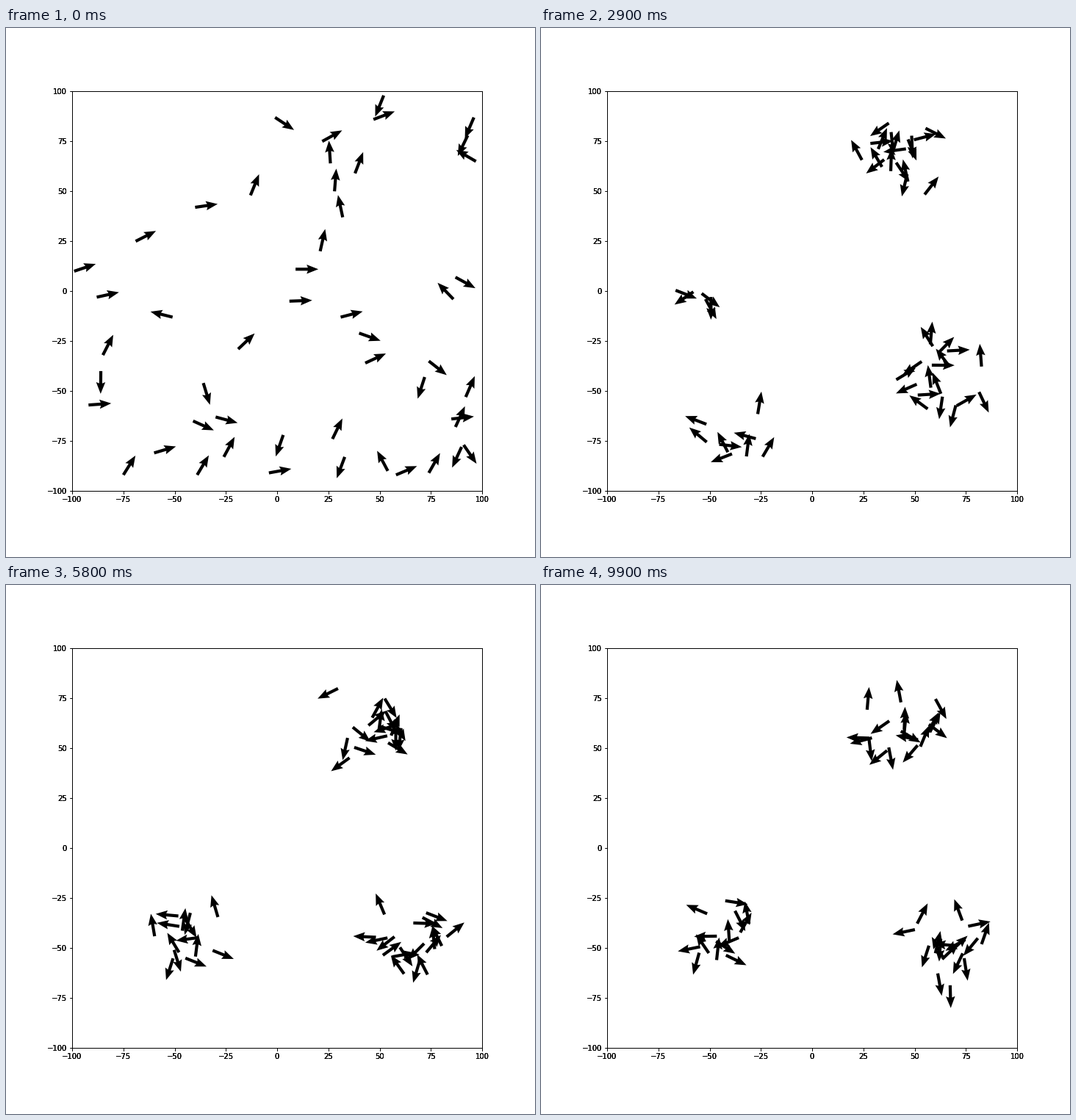
Recreate the animation shown at these times as a matplotlib script. Size 720 by 720 pixels, loop 10000 ms.

```python
import numpy as np
import matplotlib.pyplot as plt
from matplotlib.animation import FuncAnimation

FRAMES, INTERVAL, LIMIT = 100, 100, 100

# start points, sorted by heading
X = np.array([
    9, 6, -92, 85, -40, -4, -88, 31, -60, -99, 47, 58, 43, -69, 22, -19, -75,
    -39, 74, -26, -85, 27, 87, 92, -13, 38, 21, 28, 26, 32, 54, 86, 97, -51,
    93, 90, 96, 52, 33, 3, 72, -86, -36, 91, 74, -1, 87, -41, 40, -30])
Y = np.array([
    11, -5, -57, -64, 42, -91, -3, -13, -81, 10, 86, -92, -36, 25, 75, -29,
    -92, -92, -91, -83, -32, -74, -68, -53, 48, 59, 20, 50, 64, 37, -90, -4,
    65, -13, 78, -78, 87, 98, -83, -72, -43, -40, -46, -77, -35, 87, 7, -65,
    -21, -63])
N = len(X)
HEADING = np.radians(np.interp(
    np.arange(N),
    [0, 14, 16, 25, 29, 33, 34, 40, 44, 49],
    [0, 29, 58, 69, 102, 166, 244, 252, 322, 345]))

# west, south-west, north-east, south-east
FLOCK = np.select([(X < -45) & (abs(Y) < 35), (X < -25) & (Y < -35), Y > -10],
                  [0, 1, 2], 3)
HOME = np.array([[-62, 1], [-34, -72], [36, 65], [62, -43]])[FLOCK]
MERGED = np.array([[-46, -44], [-46, -44], [43, 62], [63, -48]])[FLOCK]
RADIUS = np.array([14, 15, 20, 19])[FLOCK]


def centres(step):
    t = np.clip((step - 20) / 35, 0, 1)
    return HOME + (MERGED - HOME) * t * t * (3 - 2 * t)


def polar(angle):
    return np.column_stack([np.cos(angle), np.sin(angle)])


def simulate():
    rng = np.random.default_rng(7)
    pos, angle = np.column_stack([X, Y]).astype(float), HEADING
    reach = RADIUS * np.sqrt(rng.random(N))
    phase = rng.uniform(-np.pi, np.pi, N)
    spin = rng.normal(0, 0.04, N)
    states = [(pos, angle)]
    for step in range(1, FRAMES):
        goal = centres(step) + reach[:, None] * polar(phase + spin * step)
        gap = goal - pos
        error = np.arctan2(gap[:, 1], gap[:, 0]) - angle
        error = (error + np.pi) % (2 * np.pi) - np.pi
        angle = angle + 0.3 * error + rng.normal(0, 0.35, N)
        speed = 1.5 + np.minimum(np.hypot(*gap.T), 40) / 25
        pos = np.clip(pos + speed[:, None] * polar(angle), -LIMIT, LIMIT)
        states.append((pos, angle))
    return states


def add_axes(fig):
    ax = fig.add_axes([0.125, 0.125, 0.775, 0.755])
    ax.patch.set_visible(False)
    ticks = np.arange(-LIMIT, LIMIT + 1, 25)
    ax.set(xlim=(-LIMIT, LIMIT), ylim=(-LIMIT, LIMIT),
           xticks=ticks, yticks=ticks)
    return ax


plt.rcParams.update({"font.family": "DejaVu Sans", "font.size": 10})
fig = plt.figure(figsize=(10, 10), dpi=72, facecolor="white")

# stacked axes give the labels their heavy edges
ax = [add_axes(fig) for _ in range(3)][0]

states = simulate()
arrows = ax.quiver(X, Y, np.cos(HEADING), np.sin(HEADING), color="black",
                   units="width", scale=18, width=0.0075,
                   headwidth=3, headlength=3.8, headaxislength=3.4)
ax.set(xlim=(-LIMIT, LIMIT), ylim=(-LIMIT, LIMIT))


def draw(i):
    pos, angle = states[i]
    arrows.set_offsets(pos)
    arrows.set_UVC(np.cos(angle), np.sin(angle))
    return [arrows]


anim = FuncAnimation(fig, draw, frames=FRAMES, interval=INTERVAL,
                     init_func=lambda: draw(0), repeat=True, repeat_delay=0)
plt.show()
```
